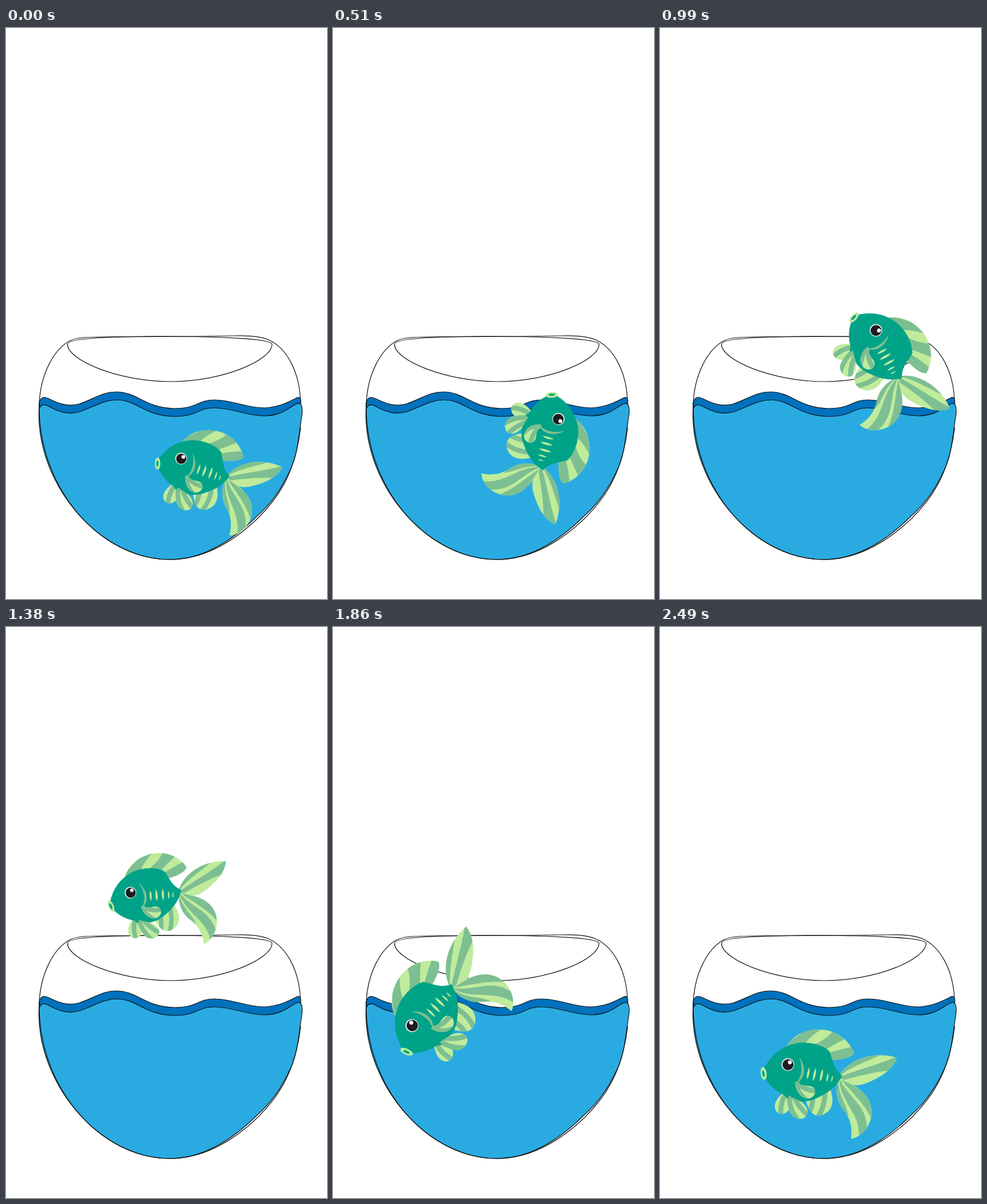
Recreate the animation shown at these times as an HTML page. Size 561 by 998 pixels, loop 2520 ms.

```html
<!DOCTYPE html>
<html lang="en">
<head>
<meta charset="utf-8">
<title>Jumping fish</title>
<style>
  html, body { margin: 0; width: 100%; height: 100%; overflow: hidden; background: #fff; }
  svg { display: block; width: 100vw; height: 100vh; }
  .line { fill: none; stroke: #111; stroke-width: 1.2; }
  .deep { fill: #0071bc; }
  .water { fill: #29abe2; }
  .body { fill: #00a388; }
  .pale { fill: #bfeb9b; }
  .mid { fill: #7dbf92; }
  .rib { fill: none; stroke: #7dbf92; stroke-width: 8; }

  #fish {
    transform-origin: 380px 805px;
    animation: leap 2520ms linear infinite;
  }
  @keyframes leap {
    0%      { translate: 0 0; rotate: 0deg; scale: 1; }
    11.905% { translate: -83px 14px; rotate: 104deg; scale: 1.035; }
    21.43%  { translate: -30px -50px; rotate: 85deg; scale: 1.04; }
    29.76%  { translate: -30px -54px; rotate: 79deg; scale: 1.04; }
    39.286% { translate: 19px -182px; rotate: 42.5deg; scale: 1.06; animation-timing-function: cubic-bezier(.3, .45, .65, 1); }
    47.62%  { translate: -43px -352px; rotate: 0deg; scale: 1; animation-timing-function: cubic-bezier(.4, .2, .7, .7); }
    54.762% { translate: -75px -322px; rotate: -22.5deg; scale: .987; }
    64.286% { translate: -127px -217px; rotate: -66deg; scale: 1.1; }
    73.81%  { translate: -156px -160px; rotate: -66deg; scale: 1.11; }
    85.714% { translate: -62px -51px; rotate: -18deg; scale: 1.08; animation-timing-function: ease-out; }
    95.24%, 100% { translate: -70px 4px; rotate: -8deg; scale: 1.075; }
  }
</style>
</head>
<body>
<svg viewBox="0 0 561 998" preserveAspectRatio="none">
  <defs>
    <clipPath id="dorsal"><path d="M307 725C318 709 338 702 357 703C390 704 411 728 415 750C408 757 394 757 380 756L350 730Z"/></clipPath>
    <clipPath id="upper"><path d="M386 783C398 766 424 757 446 758C464 759 476 763 483 767C474 785 452 796 422 802C408 803 396 799 386 787Z"/></clipPath>
    <clipPath id="lower"><path d="M384 789C376 804 376 823 385 838C396 856 395 872 391 887C410 886 426 870 430 850C434 824 416 805 389 788Z"/></clipPath>
    <clipPath id="anal"><path d="M327 815C330 838 337 843 350 842C366 838 373 826 369 803L340 806Z"/></clipPath>
    <clipPath id="pelvic"><path d="M292 797C279 806 273 815 276 824C280 833 290 834 298 826C299 836 304 841 312 843C323 845 328 837 327 830C325 818 313 812 307 800Z"/></clipPath>
    <clipPath id="pectoral"><path d="M314 782C312 796 317 808 329 812C341 814 347 803 342 796C336 789 324 794 319 784Z"/></clipPath>
    <path id="scale" class="pale" d="M0 -11Q4 0 -1 11Q-4 1 0 -11Z"/>
  </defs>

  <g class="line">
    <path d="M58 658C60 606 83 561 113 546C124 541 140 540 162 540L328 539L400 538C430 537 447 540 459 545C492 560 512 602 514.500 648"/>
    <path d="M107.500 553C107.500 580 195 618 288 618C380 618 465 580 465 553C464 543 386 540 287 539C190 539 108 541 107.500 553Z"/>
    <path class="deep" d="M58 660C58 645 66 643 75 648C95 658 110 662 128 657C155 648 168 636 193 636C230 636 242 664 294 665C336 665 334 650 364 650C396 650 420 664 452 664C480 662 494 653 507 647C514 643 516 648 515 656V686H59Z"/>
    <path class="water" d="M57.500 674C57 657 66 656 76 662C94 672 110 676 128 671C155 662 170 650 195 650C228 650 242 678 294 679C336 679 334 664 364 664C396 664 420 678 452 678C484 677 494 663 508 657C517 653 519 664 517 678C511 715 510 745 497 772C482 805 465 830 440 852C392 900 340 929 286 929C168 929 57 805 57.500 674Z"/>
    <path d="M58 655C55 806 166 929 286 929C345 929 395 900 440 857C470 827 505 785 515 698"/>
  </g>

  <g id="fish">
    <g clip-path="url(#dorsal)">
      <path class="pale" d="M300 695H420V765H300Z"/>
      <path class="mid" d="M300 728C312 716 326 710 335 706L344 700H376C358 708 343 716 337 726ZM349 728C366 723 378 718 386 709L404 724C390 730 374 735 362 742ZM370 745C386 741 400 740 418 739V765H378Z"/>
    </g>
    <g clip-path="url(#anal)">
      <path class="pale" d="M320 800H380V846H320Z"/>
      <path class="rib" d="M340 804Q338 824 328 838M360 802Q358 826 343 844"/>
    </g>
    <g clip-path="url(#upper)">
      <path class="pale" d="M380 750H490V806H380Z"/>
      <path class="mid" d="M384 785C402 772 430 767 460 758L400 750ZM386 785C422 776 452 774 486 764L470 786C443 784 412 788 390 791Z"/>
    </g>
    <g clip-path="url(#lower)">
      <path class="pale" d="M374 784H436V890H374Z"/>
      <path class="mid" d="M388 789C405 800 424 812 434 834L428 858C420 832 402 812 388 789ZM387 790C396 820 424 836 419 874L404 886C412 850 384 826 385 792ZM384 790L374 812L384 838L392 850C392 830 380 815 384 790Z"/>
    </g>
    <g clip-path="url(#pelvic)">
      <path class="pale" d="M270 794H330V846H270Z"/>
      <path class="rib" d="M297 799Q284 812 283 836M302 800Q297 824 310 846M307 800Q312 824 328 840"/>
    </g>

    <path class="body" d="M266 755C279 736 296 724 320 721C342 719 365 728 376 741C380 758 378 770 391 783C382 797 367 807 347 813C335 817 326 817 318 815L300 803L299 808C295 806 294 803 293 801C281 794 271 782 266 769Z"/>
    <path class="mid" d="M326 743C336 763 331 781 312 787C326 778 330 762 326 743Z"/>
    <g clip-path="url(#pectoral)">
      <path class="pale" d="M308 778H348V816H308Z"/>
      <path class="rib" d="M315 782Q314 800 328 815M320 786Q326 798 346 802"/>
    </g>
    <use href="#scale" transform="translate(337 772) rotate(16) scale(.9)"/>
    <use href="#scale" transform="translate(347 775) rotate(16)"/>
    <use href="#scale" transform="translate(358 778) rotate(16)"/>
    <use href="#scale" transform="translate(367 783) rotate(16) scale(.7)"/>
    <use href="#scale" transform="translate(374 786) rotate(16) scale(.5)"/>

    <ellipse class="pale" cx="265" cy="762" rx="4.800" ry="10.500"/>
    <ellipse class="body" cx="264.600" cy="762" rx="2" ry="5.500"/>
    <circle cx="306" cy="753" r="10.300" fill="#e9eeec"/>
    <circle cx="306.300" cy="753.300" r="8.900" fill="#1d1b1f"/>
    <circle cx="309.800" cy="750" r="3.200" fill="#fff"/>
  </g>
</svg>
</body>
</html>
```
